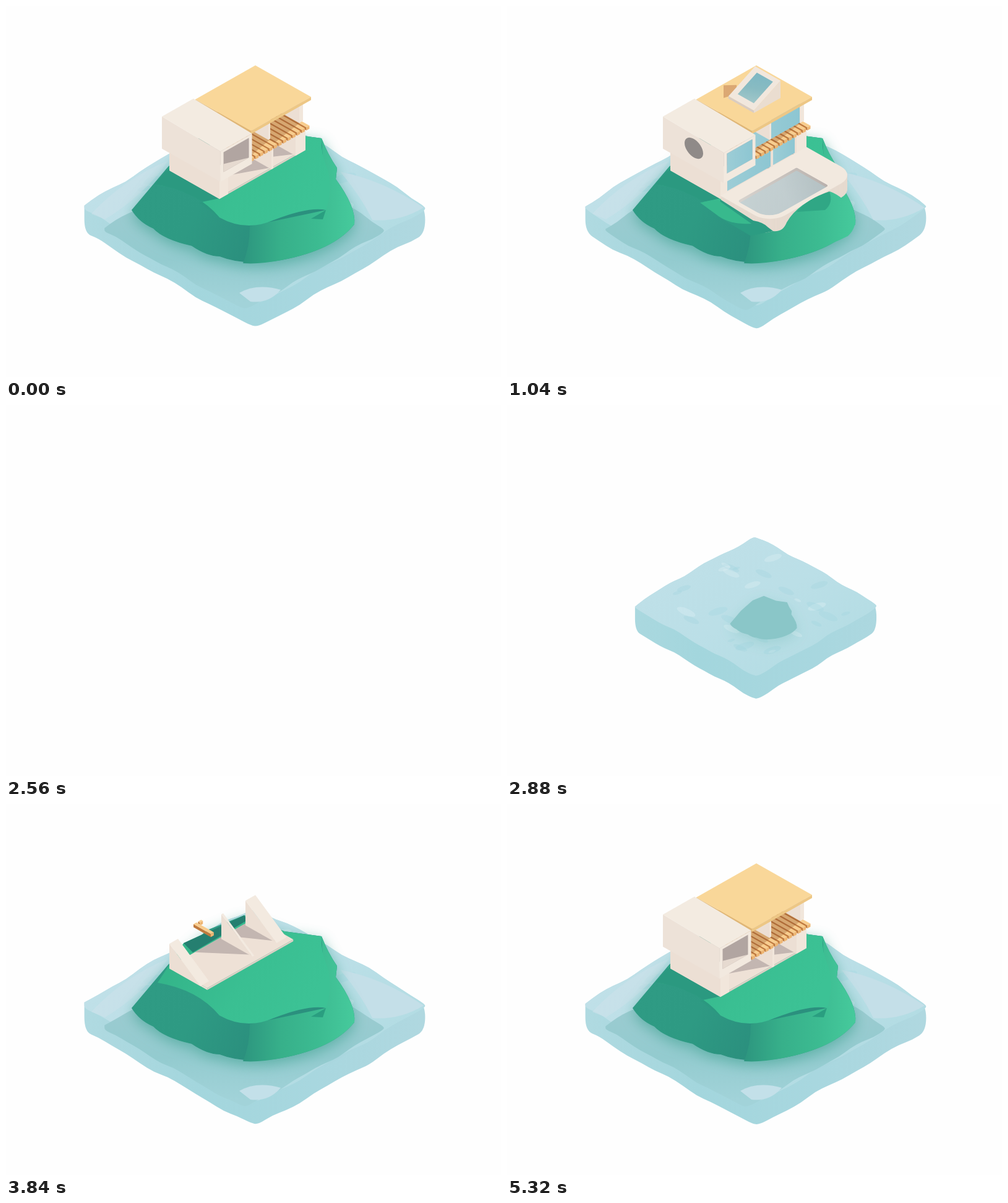
An HTML page with a canvas that plays this animation: 800 px wide and 600 px high, repeating every 5.36 s.

```html
<!DOCTYPE html>
<html lang="en">
<head>
<meta charset="utf-8">
<title>Island house</title>
<style>
  html, body { margin: 0; width: 100%; height: 100%; overflow: hidden; background: #fefefe; }
  canvas { display: block; }
</style>
</head>
<body>
<canvas id="stage" width="800" height="600"></canvas>
<script>
const ctx = document.getElementById('stage').getContext('2d');
const LOOP = 5360, STEP = 40, BUILD_START = 2560, REST = 4360;
let T = 0; // time since the build began

const clamp = v => Math.max(0, Math.min(1, v));
const linear = (a, b) => clamp((T - a) / (b - a));
const prog = (a, b) => { const p = linear(a, b); return p * p * (3 - 2 * p); };
const easeOut = (a, b) => 1 - (1 - linear(a, b)) ** 2;
const random = i => { const v = Math.sin(i * 127.1 + 3.7) * 43758.5; return v - Math.floor(v); };

function grad(x0, y0, x1, y1, ...colors) {
  const g = ctx.createLinearGradient(x0, y0, x1, y1);
  colors.forEach((c, i) => g.addColorStop(i / (colors.length - 1), c));
  return g;
}
function shape(fill, path) {
  ctx.fillStyle = fill;
  ctx.fill(new Path2D(path));
}
function saved(draw) {
  ctx.save();
  draw();
  ctx.restore();
}
function layer(alpha, draw) {
  if (alpha > 0) saved(() => { ctx.globalAlpha *= alpha; draw(); });
}
function scaled(s, x, y, draw) {
  if (s > 0) saved(() => {
    ctx.translate(x, y);
    ctx.scale(s, s);
    ctx.translate(-x, -y);
    draw();
  });
}

// ---- isometric space: x runs down-right, y up-right, z up ----
const OX = 264, OY = 266, SLOPE = 0.567;

function face(fill, ...points) {
  ctx.beginPath();
  for (const [x, y, z] of points) ctx.lineTo(OX + x + y, OY + SLOPE * (x - y) - z);
  ctx.closePath();
  ctx.fillStyle = fill;
  ctx.fill();
}
const CREAM = { top: '#f3eae0', left: '#ecdfd4', front: '#f1e6db' };
const ROOF = { top: '#f9d799', left: '#dfb676', front: '#edc785' };
const WOOD = { top: '#f8cd8e', left: '#c07a3e', front: '#eeb673' };

// A box whose top may slope from hBack (near x) to hFront (far x)
function box(x, y, z, dx, dy, hBack, hFront, paint) {
  const X = x + dx, Y = y + dy, b = z + hBack, f = z + hFront;
  face(paint.left, [x, y, z], [x, y, b], [X, y, f], [X, y, z]);
  face(paint.top, [x, y, b], [x, Y, b], [X, Y, f], [X, y, f]);
  face(paint.front, [X, y, f], [X, Y, f], [X, Y, z], [X, y, z]);
}
const frontPane = (fill, x, y0, y1, z0, z1) =>
  face(fill, [x, y0, z0], [x, y0, z1], [x, y1, z1], [x, y1, z0]);

function slabPath(x, y, z, dx, dy, radii) {
  const path = new Path2D(), flat = new Path2D();
  flat.roundRect(x, y, dx, dy, radii);
  path.addPath(flat, new DOMMatrix([1, SLOPE, 1, -SLOPE, OX, OY - z]));
  return path;
}
function fillSlab(fill, ...slab) {
  ctx.fillStyle = fill;
  ctx.fill(slabPath(...slab));
}

// ---- water ----
const CX = 402, CY = 326, HALF_W = 281, HALF_H = 159, DEPTH = 37;

// Rippled side of a diamond; quarter 0 runs from left to top, then clockwise
function ripple(quarter, k, cx, cy) {
  const dir = q => [-Math.cos(q * Math.PI / 2), -Math.sin(q * Math.PI / 2)];
  const a = dir(quarter), b = dir(quarter + 1), points = [];
  for (let j = 0; j <= 12; j++) {
    const s = 0.02 + 0.96 * j / 12;
    const bulge = (quarter < 2 ? -5 : 1) * Math.sin(s * Math.PI);
    const wave = 2.2 * Math.sin(s * 16 + quarter * 2 + T / 290) + 1.4 * Math.sin(s * 29 - quarter + T / 210);
    points.push([
      cx + HALF_W * k * (a[0] + (b[0] - a[0]) * s),
      cy + HALF_H * k * (a[1] + (b[1] - a[1]) * s) + (bulge + wave) * k]);
  }
  return points;
}
function diamond(fill, k, cx, cy, drop = 0) {
  const p = [0, 1, 2, 3].flatMap(q => ripple(q, k, cx, cy + (q > 1 ? drop : 0)));
  ctx.beginPath();
  p.forEach(([x, y], i) => {
    const [nx, ny] = p[(i + 1) % p.length];
    ctx.quadraticCurveTo(x, y, (x + nx) / 2, (y + ny) / 2);
  });
  ctx.closePath();
  ctx.fillStyle = fill;
  ctx.fill();
}
function drawWater() {
  const k = prog(-40, 520);
  if (k < 0.02) return;
  diamond(grad(125, 0, 680, 0, '#b0dae1', '#a3d6dd', '#a8d7df', '#b0d8e0'), k, CX, CY, DEPTH * Math.min(1, k * 3));
  diamond(grad(300, 190, 470, 480, '#c0e0e8', '#bbdfe7', '#b2dce3'), k, CX, CY);
  scaled(k, CX, CY, () => {
    for (let i = 0; i < 34; i++) {
      const u = random(i) * 1.7 - 0.85, v = random(i + 50) * 1.7 - 0.85, r = 8 + 16 * random(i + 90);
      ctx.beginPath();
      ctx.ellipse(CX + (u - v) * HALF_W / 2, CY + (u + v) * HALF_H / 2 + 2 * Math.sin(T / 300 + i),
        r, r * 0.35, i % 2 ? 0.4 : -0.3, 0, 7);
      ctx.fillStyle = i % 3 ? 'rgba(160,212,223,.3)' : 'rgba(218,237,242,.4)';
      ctx.fill();
    }
  });
}
function drawSeabed() {
  diamond(grad(0, 340, 0, 480, '#9acbd0', '#93cbcf', '#a2d3d9'), 0.82, 385, 362);
  shape('#c3e0e9', 'M377 464Q405 448 444 459Q424 482 395 478Z');
  shape('#c4dfe8', 'M540 268Q610 282 675 326Q635 350 592 346Q575 310 540 268Z');
  shape('rgba(202,226,234,.7)', 'M138 336Q190 280 262 250Q225 305 160 345Z');
}

// ---- island ----
const RIGHT_SIDE = 'L510 214Q520 240 535 262L533 280Q566 325 563 353Q530 395 445 411';
const BODY = 'M203 330L262 260 325 204 385 180 450 206' + RIGHT_SIDE +
  'Q385 421 345 405Q325 405 300 388Q255 378 238 360Q215 350 203 330Z';
const frontShade = () => grad(385, 0, 563, 0, '#2d967f', '#37b08a', '#3cbb91', '#46ca9c');

function drawIsland() {
  shape(grad(210, 300, 390, 400, '#2f9b84', '#2e9a83', '#2b907e'), BODY);
  shape(frontShade(), 'M383 416Q394 390 394 356L517 330' + RIGHT_SIDE + 'Q410 418 383 416Z');
  shape(grad(300, 220, 480, 340, '#34b58a', '#3abf92', '#3cc295'),
    'M245 289L287 225 385 180 450 206 510 214Q508 238 520 265Q528 300 517 330Q490 324 433 346Q388 366 345 342Q310 300 245 289Z');
  shape('#257f70', 'M287 225L385 180 390 188 302 240Z');
  shape('#2a9e80', 'M493 344L517 330 512 345Z');
}

// ---- house ----
const FLOOR_X = 81, FLOOR_Y = 139, STOREY = 44, ROOF_Z = 84;
const WALLS = [{ y: 123, thick: 16 }, { y: 84, thick: 3 }, { y: 0, thick: 14 }];

function drawGround() {
  const reach = FLOOR_X * prog(920, 1540), floor = FLOOR_X * prog(900, 1460);
  const back = 40 * prog(700, 1080), front = 40 * prog(1290, 1740), covered = prog(1500, 1950);
  if (!back) return;
  layer(covered, () => shape('#2b9980', 'M240 288L264 262 345 311 312 318 345 342Q310 300 240 288Z'));
  box(0, 0, 0, floor, FLOOR_Y, 3, 3, { ...CREAM, top: '#eee1d6', front: '#ddd0c6' });
  for (const { y, thick } of WALLS) {
    const spread = Math.min(y, 43 + 27 * covered) * (y < 100 ? 1 : 0.8);
    if (y) face('#c3b6b1', [0, y, 3], [0, y - spread, 3], [45 * covered, y - spread, 3], [reach, y, 3]);
    box(0, y, 0, reach, thick, back, front, CREAM);
  }
}
function drawSlats() {
  const count = 13, pitch = 97 / count;
  for (let i = count - 1; i >= 0; i--) {
    const start = 1200 + i * 57, u = prog(start, start + 220);
    if (u) box(-4, 43 + i * pitch, STOREY - 4, 93 * u, pitch * 0.66, 5, 5, WOOD);
  }
}
function drawUpperWalls() {
  const height = ROOF_Z - STOREY, mid = height * prog(1880, 2310), right = height * prog(2040, 2400);
  const shadow = (alpha, y0, y1) => layer(alpha, () =>
    face('#8a4f2c', [-4, y0, 46], [-4, y1, 46], [78, y1, 46], [86, y0, 46]));
  shadow(0.3 * prog(1880, 2150), 43, 84);
  shadow(0.3 * prog(2300, 2600), 84, 133);
  if (right) box(0, 133, STOREY + 1, 77, 6, right, right, CREAM);
  glass(prog(2880, 3240), 76, 44, 133, STOREY + 1, ROOF_Z);
  if (mid) box(-2, 84, STOREY + 1, 78, 3, mid, mid, CREAM);
}
function glass(alpha, x, y0, y1, z0, z1) {
  const left = OX + x + y0;
  layer(alpha, () => frontPane(grad(left, 0, left + y1 - y0, 0, '#9dcdd6', '#8dc6d2'), x, y0, y1, z0, z1));
}
function drawRoof() {
  const u = prog(2260, 2660);
  if (u) box(-2, 44, ROOF_Z, 90 * u, 97, 5, 5, ROOF);
}
function drawBox() {
  const h = 52 * prog(2220, 2420), length = 98.5 * easeOut(2320, 2920);
  if (!h) return;
  const x = 2.5, y = -14.5, z = 45, end = x + length, top = z + h;
  box(x, y, z, length, 51, h, h - 3, { top: '#f3ebe1', left: '#ede2d8', front: '#f2e9df' });
  if (top < 97) return;
  frontPane('#b1a5a1', end, y + 5, y + 46, top - 39, top - 7);
  face('#e6dad0', [end, y + 5, top - 39], [end, y + 5, top - 26], [end, y + 46, top - 39]);
  glass(prog(2960, 3260), end, y + 5, y + 46, top - 39, top - 7);

  const mark = 15 * prog(3200, 3520);
  saved(() => {
    ctx.transform(1, SLOPE, 0, 1, 302, 230);
    ctx.beginPath();
    ctx.arc(0, 0, mark, 0, 7);
    ctx.fillStyle = '#8f8a88';
    ctx.fill();
  });
}
function drawSkylight() {
  const x = 23, X = 64, y = 71, Y = 114, z = ROOF_Z + 5;
  // Point on the tilted pane, inset from its rim
  const tilted = (px, s) => [px, y + (Y - y) * s, z + 4 + 24 * s];
  scaled(prog(2960, 3340), 400, 152, () => {
    face('#dba873', [0, y + 15, z], [10, Y - 17, z], [x, y + 14, z], [18, y - 3, z]);
    face('#eaddd0', [X, y, z], tilted(X, 0), tilted(X, 1), [X, Y, z]);
    face('#d9ccc2', [x, y, z], tilted(x, 0), tilted(X, 0), [X, y, z]);
    face('#f1e7dd', tilted(x, 0), tilted(x, 1), tilted(X, 1), tilted(X, 0));
    face(grad(400, 106, 390, 158, '#7db7c3', '#88bbc2', '#a3c8ca'),
      tilted(x + 8, 0.16), tilted(x + 8, 0.88), tilted(X - 7, 0.88), tilted(X - 7, 0.16));
  });
}
function drawDeck() {
  const u = prog(2960, 3480);
  if (!u) return;
  const depth = 80 * u, corner = 24 * u;
  for (let z = -18; z < 5; z++) fillSlab('#e6dacf', FLOOR_X, 0, z, depth, FLOOR_Y, [0, corner, corner, 0]);
  fillSlab('#f2e9df', FLOOR_X, 0, 5, depth, FLOOR_Y, [0, corner, corner, 0]);
  const pool = z => slabPath(FLOOR_X + 21 * u, 6, z, 52 * u, 96, [4, 20 * u, 3, 2]);
  saved(() => {
    ctx.clip(pool(5));
    ctx.fillStyle = grad(370, 0, 522, 0, '#d8d4cf', '#b8b0ac');
    ctx.fill(pool(5));
    layer(prog(3400, 4200), () => {
      ctx.fillStyle = grad(400, 320, 490, 275, '#b9d1d7', '#bdd6dd', '#b2cdd4');
      ctx.fill(pool(0));
    });
  });
  layer(u, () => {
    shape('#2c9c82', 'M345 313L398 347Q415 350 422 358L430 364 394 372 340 340Z');
    shape('#38b98d', 'M312 318L340 313 395 352Q362 354 342 340Z');
    shape(frontShade(), 'M430 364Q446 366 452 350Q470 318 522 300Q545 308 560 335Q568 356 551 372Q500 398 420 414L394 372Z');
    shape('#30a785', 'M468 333Q485 312 521 300Q528 318 514 330Z');
  });
}
function drawIslandAndHouse() {
  const s = prog(160, 600);
  layer(clamp(s * 2 - 0.7), () => scaled(s, 428, 364, drawSeabed));
  scaled(s, 428, 364, () => {
    saved(() => {
      ctx.shadowColor = `rgba(70,165,150,${0.7 * s})`;
      ctx.shadowBlur = 22;
      ctx.shadowOffsetY = 7;
      shape('#8ac6c8', BODY);
    });
    layer(clamp((s - 0.35) / 0.25), drawIsland);
  });
  drawGround();
  const pane = prog(2880, 3240);
  glass(pane, 78, 14, 84, 3, 43);
  glass(pane, 78, 88, 123, 3, 43);
  drawDeck();
  drawSlats();
  drawUpperWalls();
  drawRoof();
  drawBox();
  drawSkylight();
}

function render(now) {
  const t = Math.floor(now % LOOP / STEP) * STEP;
  T = Math.min(REST, (t - BUILD_START + LOOP) % LOOP);
  ctx.fillStyle = '#fefefe';
  ctx.fillRect(0, 0, 800, 600);
  drawWater();
  drawIslandAndHouse();
}
const start = performance.now();
function tick() {
  render(performance.now() - start);
  requestAnimationFrame(tick);
}
tick();
</script>
</body>
</html>
```
